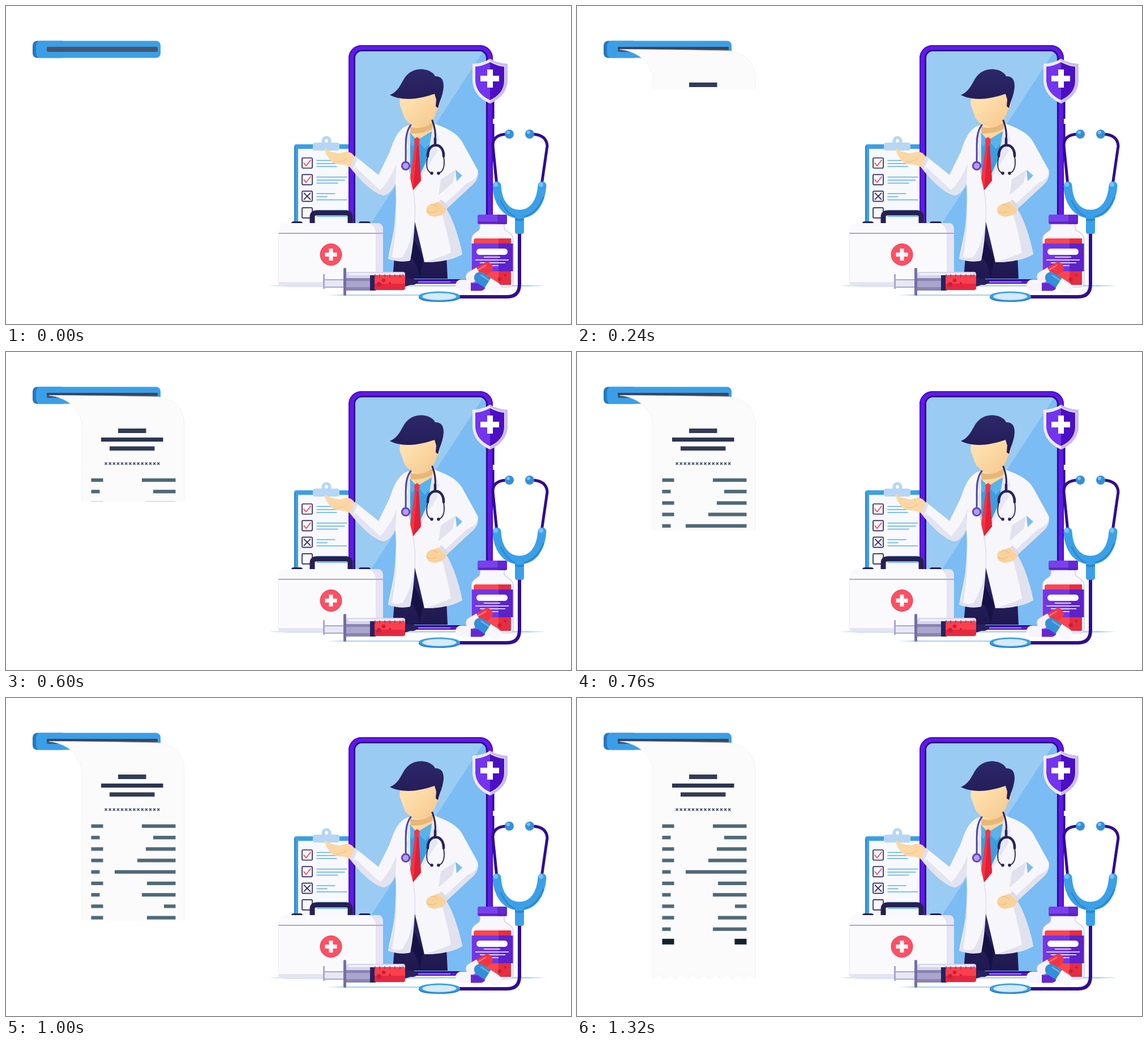
An HTML page for the animation above (3040 ms loop, 998 by 561 pixels).

```html
<!DOCTYPE html>
<html lang="en">
<head>
<meta charset="utf-8">
<title>Medical receipt</title>
<style>
html, body { margin: 0; width: 100%; height: 100%; overflow: hidden; background: #fff; }
svg { display: block; width: 100%; height: 100%; }
.line { fill: none; stroke-linecap: round; stroke-linejoin: round; }
</style>
</head>
<body>
<svg viewBox="0 0 998 561">
  <defs>
    <linearGradient id="skin" x1="0" y1="0" x2="1" y2="1">
      <stop offset=".25" stop-color="#ffe0ad"/><stop offset="1" stop-color="#f4c68c"/>
    </linearGradient>
    <linearGradient id="hair" x1="0" y1="0" x2="0" y2="1">
      <stop offset="0" stop-color="#2d2869"/><stop offset="1" stop-color="#211a55"/>
    </linearGradient>
    <linearGradient id="pants" x1="0" y1="0" x2="0" y2="1">
      <stop offset="0" stop-color="#2c2669"/><stop offset="1" stop-color="#1f184f"/>
    </linearGradient>
    <clipPath id="wipe"><rect id="reveal" x="60" y="60" width="270" height="0"/></clipPath>
    <clipPath id="screen"><rect x="617" y="80" width="231" height="402" rx="12"/></clipPath>
    <clipPath id="bottle"><path id="glass" d="M837 384V391Q837 395 832 398Q822 403 822 413V488Q822 496 830 496H888Q896 496 896 488V413Q896 403 886 398Q880 395 880 391V384Z"/></clipPath>
  </defs>

  <!-- ground -->
  <path d="M464 493.5L500 492H920L954 493.5L920 495H500Z" fill="#b4d8f3"/>
  <path d="M566 510L600 509H735V511H600Z" fill="#a9cdec"/>

  <!-- clipboard -->
  <rect x="509" y="244" width="110" height="150" rx="4" fill="#3b9fe6"/>
  <path d="M509 248V390H511V248Z" fill="#2b80c5"/>
  <rect x="516" y="252" width="100" height="140" fill="#f7f9fd"/>
  <g id="checks" class="line"></g>
  <circle cx="566" cy="238" r="6" fill="none" stroke="#b5d6f5" stroke-width="5"/>
  <rect x="542" y="241" width="47" height="14" rx="4" fill="#b5d6f5"/>
  <path d="M557 242Q558 235 566 235T575 242Z" fill="#b5d6f5"/>
  <circle cx="566" cy="238" r="3" fill="#fff"/>

  <!-- phone -->
  <path d="M860 166h2.5v33H860zM860 208h2.5v34H860z" fill="#2b0b86"/>
  <rect x="605" y="69" width="255" height="421" rx="23" fill="#6019e8"/>
  <rect x="606" y="70" width="253" height="419" rx="22" fill="none" stroke="#4a10c6" stroke-width="2"/>
  <rect x="615.7" y="78.7" width="233.6" height="404.6" rx="13" fill="#7abcf3" stroke="#2d0b88" stroke-width="2.8"/>
  <path d="M617 80H843L617 426Z" fill="#9acbf2" clip-path="url(#screen)"/>

  <!-- doctor -->
  <path d="M718 378L690 405Q686 440 683 481H780Q779 450 776 420L740 390Z" fill="url(#pants)"/>
  <path d="M721 412L737 446L731 481Q726 450 714 443Z" fill="#171245"/>
  <path d="M714 206L754 198L754 240L728 258L711 230Z" fill="url(#skin)"/>
  <path d="M714 213Q738 220 755 203L754 216Q738 226 715 225Z" fill="#e7b779"/>
  <path d="M713 223L726 237L751 222L758 238L742 318L720 325L710 290Z" fill="#399fe1"/>
  <path d="M726 237L751 222L756 235L740 252ZM713 223L725 237L717 249L710 232Z" fill="#59b2ec"/>
  <path d="M711 210C692 217 685 236 678 257L658 298L618 266L610 287C627 309 652 333 668 334C679 331 684 321 688 312L689 340C690 385 680 418 675 446C689 451 704 452 714 449Q720 420 722 380Q732 420 739 452C765 453 790 447 806 438C800 404 787 379 778 358L820 319Q837 306 833 289L806 240C798 225 779 215 755 207Q757 246 740 283L719 325Q710 290 711 250Q708 230 714 213Z" fill="#f7f7fb"/>
  <path d="M794 289L806 299L796 309Z" fill="#7abcf3"/>
  <path d="M668 334C679 331 684 321 688 312L690 277Q680 305 661 325L617 284L612 290C630 313 655 333 668 334Z" fill="#e3e4f0"/>
  <path d="M689 330Q687 415 675 446Q694 452 714 449L722 380Q716 420 700 443Q688 447 682 442Q691 395 689 330Z" fill="#e1e2ee"/>
  <path d="M806 438Q795 385 778 358L770 366Q781 405 786 435Q766 444 739 452Q777 452 806 438Z" fill="#e1e2ee"/>
  <path d="M833 289Q835 305 815 312L774 350L778 358L820 319Q837 306 833 289ZM794 289L789 312L764 334L768 306Z" fill="#e1e2ee"/>
  <path d="M719 325Q724 350 722 380" class="line" stroke="#dcdeeb" stroke-width="1.5"/>
  <path d="M713 214L703 235L711 244L708 256L719 325L714 284L714 235Z" fill="#e2e4ef"/>
  <path d="M755 207L766 236L757 246L763 255L719 325L744 270Z" fill="#e6e7f1"/>
  <path d="M765 345L778 358L782 354L769 341Z" fill="#dadbea"/>
  <path d="M721 235L726 231L731 235L729 246L733 308L719 325L714 304L722 246Z" fill="#f73340"/>
  <path d="M726 246L729 246L733 308L719 325Z" fill="#e41f35"/>
  <path d="M742 361Q742 352 750 350L764 345L778 358Q776 366 769 369L757 372Q744 371 742 361Z" fill="#f9d29b"/>
  <path d="M750 350Q758 349 763 355M744 363Q753 367 760 362" class="line" stroke="#e9b778"/>
  <path d="M563 249C567 255 574 258 590 260L601 257Q614 258 616 268L610 286C598 277 589 281 580 278C570 271 563 260 563 249Z" fill="#fbd7a4"/>
  <path d="M580 275Q592 276 602 269" class="line" stroke="#efbf83"/>
  <path d="M616 264L621 269L612 290L608 285Z" fill="#dfe0ec"/>
  <path d="M697 161Q693 171 698 181L704 198Q714 213 734 214Q750 211 758 193L761 184Q768 179 765 167L758 150L698 155Z" fill="url(#skin)"/>
  <path d="M678 157C693 151 697 138 704 127C714 112 730 109 744 113Q755 117 758 124Q773 123 773 142Q772 155 766 169L763 180L759 177L760 165L757 155C736 162 704 170 678 157Z" fill="url(#hair)"/>
  <g class="line" stroke="#4e43a5" stroke-width="3">
    <path d="M715 210C703 225 707 250 706 275"/>
    <path d="M753 202Q760 219 758 237" stroke="#29215e"/>
    <path d="M758 234V246M745 265C744 239 774 239 773 265" stroke="#29215e" stroke-width="4.5"/>
    <path d="M745 265Q739 291 752 295M773 265Q777 291 764 295" stroke="#29215e" stroke-width="1.8"/>
  </g>
  <circle cx="706" cy="282" r="6.7" fill="#b69cec" stroke="#6544bd" stroke-width="3"/>
  <circle cx="752" cy="295" r="2.8" fill="#29215e"/><circle cx="764" cy="295" r="2.8" fill="#29215e"/>

  <!-- shield -->
  <path d="M855 93Q867 101 886 102V133Q884 159 855 172Q826 159 824 133V102Q843 101 855 93Z" fill="#eeeafa"/>
  <path d="M855 93Q867 101 886 102V133Q884 159 855 172V167Q879 156 881 132V106Q866 104 855 97Z" fill="#c9bcf0"/>
  <path d="M855 99Q842 106 829 107V133Q831 155 855 166Z" fill="#7334ed"/>
  <path d="M855 99Q868 106 880 107V133Q879 155 855 166Z" fill="#4c0fc4"/>
  <path d="M850 112h10v11h11v10h-11v11h-10v-11h-12v-10h12z" fill="#fff"/>

  <!-- first aid case -->
  <path d="M541 384V372Q541 365 548 365H601Q608 365 608 372V384" fill="none" stroke="#27204f" stroke-width="9"/>
  <path d="M504 384Q504 380 508 380H520Q524 380 524 384ZM623 384Q623 380 627 380H640Q644 380 644 384Z" fill="#27204f"/>
  <path d="M490 383H657Q664 383 666 392V488Q666 494 659 494H487Q481 494 481 488V399Q482 386 490 383Z" fill="#fafafd"/>
  <path d="M640 383H657Q664 383 666 392V488Q666 494 659 494H487Q481 494 481 487H647Q653 487 653 479V402Q653 388 640 383Z" fill="#e6e3f2"/>
  <path d="M481 401H666" stroke="#aaa6cf" stroke-width="2"/>
  <path d="M481 400V488" stroke="#eceaf5"/>
  <circle cx="574" cy="438.5" r="19" fill="#ff5063" stroke="#d93a54"/>
  <path d="M570.5 428h7v7h7v7h-7v7h-7v-7h-7v-7h7z" fill="#fff"/>

  <!-- syringe -->
  <path d="M560 473h3v26h-3zM563 482h34v2h-34zM563 495h34v2h-34z" fill="#aaa7cb"/>
  <rect x="563" y="484" width="34" height="11" fill="#e8e7f4"/>
  <rect x="601" y="469" width="104" height="33" rx="4" fill="#d7d5ea"/>
  <path d="M601 480H645V485H601ZM601 496H645V502H601Z" fill="#8984b2"/>
  <path d="M601 485H645V496H601Z" fill="#aaa5cd"/>
  <rect x="643" y="475" width="10" height="27" fill="#29215e"/>
  <path d="M651 474H701Q705 474 705 479V497Q705 501 700 501H651Z" fill="#fb3f4d"/>
  <path d="M651 490H705V497Q705 501 700 501H651Z" fill="#e4283e"/>
  <path d="M605 473H699" stroke="#f6f5fc" stroke-width="3"/>
  <g fill="#c91f39"><circle cx="659" cy="491" r="4.3"/><circle cx="667" cy="484" r="3.3"/><circle cx="678" cy="489" r="2"/></g>
  <path d="M652 473V479M660 473V479M669 473V478M678 473V479M687 473V478M696 473V479" stroke="#443f7d"/>
  <rect x="596" y="462" width="5" height="49" rx="2" fill="#756fa3"/>
  <path d="M705 479L714 481H720L728 485V489L720 492H714L705 495Z" fill="#29215e"/>
  <path d="M728 486.8H785" stroke="#b4a0f3" stroke-width="1.6"/>

  <!-- large stethoscope -->
  <g class="line" stroke="#300d91" stroke-width="5">
    <path d="M885 226Q859 227 860 247L867 316M929 226Q955 227 956 247L946 316"/>
    <path d="M907 395V491Q907 513 885 513H798" stroke-width="6"/>
    <path d="M867 317C868 345 882 367 907 367S945 345 947 317" stroke="#3ba0e8" stroke-width="15"/>
    <path d="M874 344Q888 373 907 373Q936 371 949 338" stroke="#2c86ce" stroke-width="2.5"/>
  </g>
  <path d="M899 371H915V398Q915 402 911 402H903Q899 402 899 398Z" fill="#3ba0e8"/>
  <path d="M899 374Q907 377 915 374V378Q907 381 899 378Z" fill="#2c86ce"/>
  <g fill="#368fd6"><circle cx="889" cy="226" r="8"/><circle cx="925" cy="226" r="8"/></g>
  <g fill="#76c2f5"><circle cx="887" cy="223" r="3"/><circle cx="923" cy="223" r="3"/><circle cx="865" cy="315" r="4"/><circle cx="945" cy="315" r="4"/></g>
  <path d="M729 512V515Q733 522 765 522T802 515V512Z" fill="#267bc4"/>
  <ellipse cx="765.5" cy="512" rx="36.5" ry="8.5" fill="#3b9fe5"/>
  <ellipse cx="765.5" cy="512.5" rx="30" ry="6.3" fill="#d5eafa"/>

  <!-- medicine bottle -->
  <g clip-path="url(#bottle)">
    <rect x="820" y="384" width="78" height="114" fill="#f8f7fd"/>
    <rect x="826" y="410" width="66" height="82" rx="4" fill="#fb4650"/>
    <path d="M870 410H892V492H870Z" fill="#e72d42"/>
    <rect x="820" y="419" width="78" height="49" fill="#7236e7"/>
    <path d="M870 419H898V468H870Z" fill="#5d22ca"/>
    <g fill="#c91f39"><circle cx="872" cy="482" r="3.5"/><circle cx="882" cy="475" r="2.3"/></g>
  </g>
  <use href="#glass" fill="none" stroke="#c9bfe9" stroke-width="1.2"/>
  <rect x="831" y="428" width="55" height="11" rx="5.5" fill="#fff"/>
  <path d="M844 443H873M829 448H888M837 453H882M846 458H870" stroke="#fff" stroke-width="1.5"/>
  <rect x="833" y="368" width="52" height="17" rx="3" fill="#7a40ec"/>
  <path d="M868 368H882Q885 368 885 371V382Q885 385 882 385H868Z" fill="#6428d5"/>
  <path d="M834 382H884" stroke="#5921c7" stroke-width="3"/>

  <!-- capsules -->
  <g id="pills"></g>

  <!-- printer -->
  <rect x="47" y="61.5" width="60" height="30" rx="8" fill="#2678bd"/>
  <rect x="53" y="61.5" width="220" height="30" rx="8" fill="#3a9fe8"/>
  <rect x="72" y="72" width="196" height="9" rx="2" fill="#46566d"/>
  <g clip-path="url(#wipe)">
    <path d="M72 72.5H268V76H72Z" fill="#38445c"/>
    <path id="paper" fill="#fbfbfb" stroke="#efefef" stroke-width=".8"/>
    <g id="print"></g>
  </g>
</svg>
<script>
const NS = 'http://www.w3.org/2000/svg';
const byId = id => document.getElementById(id);

function add(parent, tag, attrs) {
  const node = document.createElementNS(NS, tag);
  for (const key in attrs) node.setAttribute(key, attrs[key]);
  parent.appendChild(node);
  return node;
}

function drawChecks() {
  const box = byId('checks');
  const ends = [[602, 598, 584], [602, 598, 586], [581, 567, 602], [602, 602, 602]];
  ends.forEach((row, i) => {
    const y = 268 + i * 29.3;
    add(box, 'rect', { x: 523, y, width: 18, height: 18, rx: 1.5, stroke: '#2d2564', 'stroke-width': 1.7 });
    if (i < 3) add(box, 'path', {
      d: i < 2 ? `M526 ${y + 9}l4 5 8-10` : `M526.5 ${y + 3.5}l11 11m0-11l-11 11`,
      stroke: i < 2 ? '#f34455' : '#2d2564', 'stroke-width': 1.7
    });
    row.forEach((end, j) => add(box, 'path', {
      d: `M549 ${y + 4.5 + j * 5.4}H${end}`, stroke: '#5cadea', 'stroke-width': 1.5
    }));
  });
}

function capsule(x, y, angle, length, left, right) {
  const g = add(byId('pills'), 'g', { transform: `translate(${x} ${y}) rotate(${angle})` });
  const h = length / 2, r = 10;
  add(g, 'path', { d: `M0 ${-r}H${r - h}A${r} ${r} 0 0 0 ${r - h} ${r}H0Z`, fill: left });
  add(g, 'path', { d: `M0 ${-r}H${h - r}A${r} ${r} 0 0 1 ${h - r} ${r}H0Z`, fill: right });
  add(g, 'path', { d: `M${r - h} -5H${h - r}`, class: 'line', stroke: '#fff', 'stroke-width': 2.5, opacity: .3 });
}

function drawPaper() {
  const left = 134, right = 315, teeth = 9, step = (right - left) / teeth;
  let d = `M76 76.5Q170 77 268 79C297 82 315 100 ${right} 128V496`;
  for (let i = 0; i < teeth; i++) d += `l${-step / 2} -9l${-step / 2} 9`;
  byId('paper').setAttribute('d', d + 'V130C133 101 108 80 76 76.5Z');
}

function drawPrint() {
  const print = byId('print');
  const bar = (x, end, y, height, fill) =>
    add(print, 'rect', { x, y: y - height / 2, width: end - x, height, fill });
  bar(198, 247.5, 139, 8, '#343b55');
  bar(168, 277.5, 154.5, 7.2, '#2d3451');
  bar(183, 262.5, 170.2, 7.5, '#343b55');

  let crosses = '';
  for (let i = 0; i < 14; i++) crosses += `M${174.5 + i * 7.12} 194.8l4.2 4.2m0-4.2l-4.2 4.2`;
  add(print, 'path', { d: crosses, stroke: '#38415c', 'stroke-width': 1.4 });

  const short = [1, 4, 6, 9];
  [240, 260, 247, 232, 192, 249, 240, 279, 249, 240].forEach((x, i) => {
    const y = 226 + i * 20.2;
    bar(150.5, short.includes(i) ? 165.5 : 171.5, y, 6.2, '#506978');
    bar(x, 299.5, y, 6.2, '#506978');
  });
  bar(150.5, 171.5, 429.8, 10, '#132130');
  bar(278.5, 299.5, 429.8, 10, '#132130');
}

drawChecks();
capsule(821, 492.5, 0, 54, '#f6f4fc', '#6529d3');
capsule(836, 470, -30, 52, '#fbeff2', '#f23543');
capsule(851, 488.5, 33, 54, '#328fd8', '#f7f8fd');
drawPaper();
drawPrint();

const LOOP = 3040, TICK = 40, PRINT_TICKS = 33;
const START_Y = 69.4, ROLL = 12.94;
const reveal = byId('reveal');

function render(time) {
  const tick = Math.min(Math.floor(time % LOOP / TICK), PRINT_TICKS);
  const bottom = tick ? START_Y + tick * ROLL : 60;
  reveal.setAttribute('height', bottom - 60 + (tick === PRINT_TICKS ? 2 : 0));
}

let start;
function frame(now) {
  start ??= now;
  render(now - start);
  requestAnimationFrame(frame);
}
render(0);
requestAnimationFrame(frame);
</script>
</body>
</html>
```
